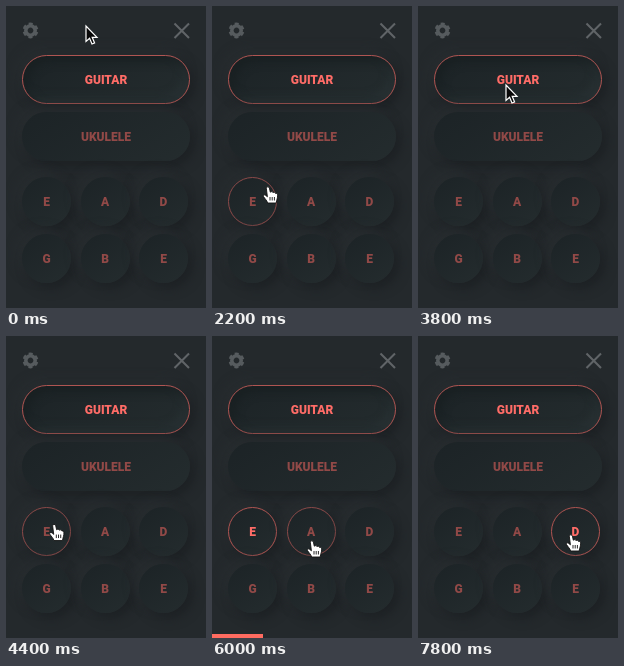
Recreate the animation shown at these times as an HTML page. Size 200 px wide and 302 px high, loop 8000 ms.

```html
<!DOCTYPE html>
<html lang="en">
<head>
<meta charset="utf-8">
<title>String tuner</title>
<style>
  html, body { margin: 0; width: 100%; height: 100%; overflow: hidden; background: #24292c; }
  #stage { position: relative; width: 200px; height: 302px; overflow: hidden; background: #24292c; }
  .button {
    position: absolute; box-sizing: border-box; height: 49px; border-radius: 25px;
    border: 1px solid transparent; color: #914947;
    background: linear-gradient(145deg, #1c2326, #242c2e) border-box;
    box-shadow: 5px 5px 11px #1d2124, -5px -5px 11px #282d30;
    font: 900 12px/48px Roboto, sans-serif; text-align: center;
  }
  .pill { width: 168px; }
  .note { width: 49px; }
  .ring { border-color: #8c4a49; }
  .lit { color: #ff6c67; border-color: #b05552; }
  .pill.lit { box-shadow: 5px 5px 11px #1d2124, -5px -5px 11px #282d30, inset 5px 5px 10px #192022, inset -5px -5px 10px #283133; }
  #bar { position: absolute; left: 0; bottom: 0; height: 4px; background: #ff6b60; }
  svg { position: absolute; left: 0; top: 0; }
</style>
</head>
<body>
<div id="stage">
  <div id="bar"></div>
  <svg width="200" height="302">
    <g transform="translate(24.5 24.5)" fill="none" stroke="#565b5e">
      <circle r="4.7" stroke-width="3.6"/>
      <circle r="6.6" stroke-width="2.6" stroke-dasharray="3.9 3.01" stroke-dashoffset="-1.5"/>
    </g>
    <path d="M168.5 17.5l14.5 14.5m0-14.5l-14.5 14.5" stroke="#606467" stroke-width="2.1"/>
  </svg>
  <svg id="pointer" width="200" height="302" style="z-index: 1">
    <path id="arrow" d="M0 0V15.5L3.6 12.2L6 18L8.6 16.9L6.2 11.3H11Z" fill="#080808" stroke="#fff" stroke-width="1.2"/>
    <path id="hand" d="M-1.7 1.2C-1.7-.6 1-.6 1.4 1.1L2.3 5.2C3.1 4.2 4.8 4.6 5 5.6C6 4.8 7.4 5.4 7.6 6.5C8.8 6 9.6 7 9.6 8.2C9.8 11 8.6 12.8 8.2 16H-.4C-.8 13.8-3.2 11.6-4.5 9.6C-5.2 8.2-3.5 7.2-2.2 8.4L-.6 9.8ZM2 10v3.5M4.2 10v3.5M6.4 10v3.5"
      fill="#fff" stroke="#111" stroke-width=".9" stroke-linejoin="round"/>
  </svg>
</div>
<script>
const LOOP = 8000, STEP = 200, BAR_SPEED = 0.033, RADIUS = 24.5;
const TUNING = { guitar: [..."EADGBE"], ukulele: [..."GCEA"] };

// Where the pointer comes to rest; it eases from stop to stop.
const STOPS = [
  { at: 0, x: 80, y: 20 },
  { at: 1200, x: 47, y: 188 },
  { at: 1700, x: 174, y: 238 },
  { at: 2200, x: 56, y: 181 },
  { at: 2400, x: 88, y: 72 },
  { at: 3000, x: 96, y: 128 },
  { at: 3800, x: 88, y: 79 },
  { at: 4500, x: 46, y: 195 },
  { at: 5000, x: 96, y: 207 },
  { at: 6000, x: 100, y: 205 },
  { at: 7400, x: 153, y: 199 }
];
const PLAYS = [{ at: 4450, string: 0 }, { at: 6370, string: 1 }, { at: 7800, string: 2 }];

const $ = id => document.getElementById(id);
const latest = (list, t) => list.findLast(item => item.at <= t);

function addButton(kind, text, left, top, width) {
  const el = document.createElement("div");
  el.className = "button " + kind;
  el.textContent = text;
  el.style.left = left + "px";
  el.style.top = top + "px";
  $("stage").append(el);
  return { el, left, top, width };
}

const pills = {
  guitar: addButton("pill", "GUITAR", 16, 49, 168),
  ukulele: addButton("pill", "UKULELE", 16, 106, 168)
};
const notes = TUNING.guitar.map((name, i) =>
  addButton("note", name, 16 + i % 3 * 58.5, 171 + Math.floor(i / 3) * 57, 49));

function pointerAt(t) {
  const from = latest(STOPS, t);
  const to = STOPS[STOPS.indexOf(from) + 1] || from;
  const k = to === from ? 0 : (t - from.at) / (to.at - from.at);
  const ease = k * k * (3 - 2 * k);
  return { x: from.x + (to.x - from.x) * ease, y: from.y + (to.y - from.y) * ease };
}

// Buttons are capsules around a horizontal centre line.
function isOver({ left, top, width }, { x, y }) {
  const nearest = Math.max(left + RADIUS, Math.min(left + width - RADIUS, x));
  return Math.hypot(x - nearest, y - top - RADIUS) < RADIUS;
}

function draw(t) {
  const tip = pointerAt(t);
  const mode = t >= 2800 && t < 3800 ? "ukulele" : "guitar";
  const play = latest(PLAYS, t);
  let clickable = false;

  const paint = (button, active, selectable) => {
    const hover = selectable && isOver(button, tip);
    clickable ||= hover;
    button.el.classList.toggle("ring", hover);
    button.el.classList.toggle("lit", active);
  };
  for (const name in pills) paint(pills[name], name === mode, name !== mode);
  notes.forEach((note, i) => {
    const label = TUNING[mode][i];
    note.el.textContent = label || "";
    note.el.style.visibility = label ? "visible" : "hidden";
    paint(note, play?.string === i, Boolean(label));
  });

  $("bar").style.width = (play ? (t - play.at) * BAR_SPEED : 0) + "px";
  $("arrow").style.display = clickable ? "none" : "";
  $("hand").style.display = clickable ? "" : "none";
  $("pointer").style.transform = `translate(${tip.x}px, ${tip.y}px)`;
  $("pointer").style.overflow = "visible";
}

function tick() {
  draw(Math.floor(performance.now() % LOOP / STEP) * STEP);
  requestAnimationFrame(tick);
}
tick();
</script>
</body>
</html>
```
